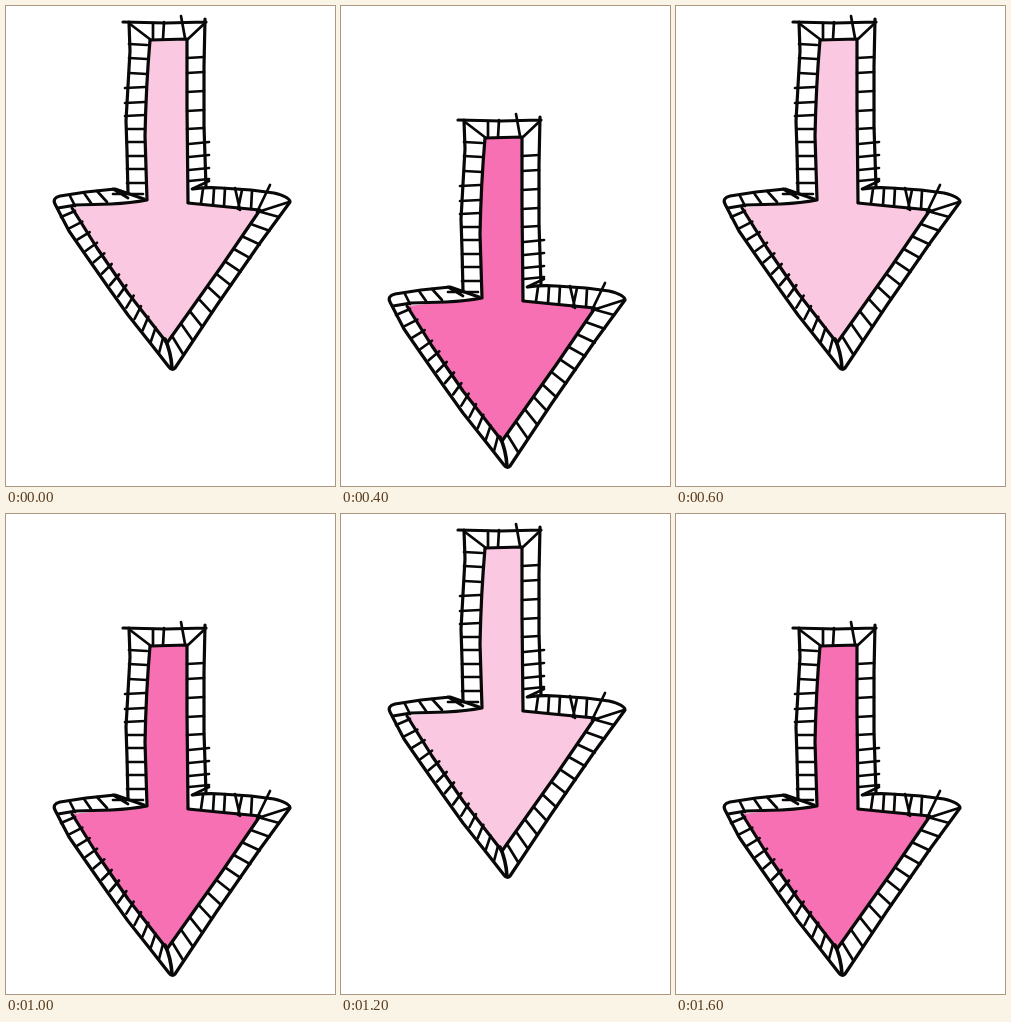
Write an HTML page that moves like this. It is 329 px wide and 480 px high and loops after 1.8 s.

```html
<!DOCTYPE html>
<html lang="en">
<head>
<meta charset="utf-8">
<title>Bouncing arrow</title>
<style>
  html, body { margin: 0; width: 100%; height: 100%; overflow: hidden; background: #fff; }
  svg { display: block; width: 329px; height: 480px; }
  .ink { fill: none; stroke: #080808; stroke-linecap: round; stroke-linejoin: round; }
</style>
</head>
<body>
<svg viewBox="0 0 329 480">
  <g id="arrow">
    <path id="fill" d="M144 34L181 33L181 100L182 197L212 200L254 204L215 261L161 337L122 287L91 242L66 202L105 198L141 194Q137 145 140 85Z"/>
    <g class="ink" stroke-width="3.2">
      <path d="M117 16L160 17L200 16M199 13L198 60L198 120L200 181"/>
      <path d="M123 16L124 45L122 80L120 115L121 145L122 187"/>
      <path d="M187 183Q200 181 215 182L245 184L268 187Q284 191 284 196L254 237L211 299L169 362Q166 365 163 361L145 338L122 309L102 281L81 251L63 225L49 198Q46 192 54 190L80 186L109 183L138 193"/>
      <path d="M144 34L181 33L181 100L182 196M144 34Q140 80 139 130L141 194Q125 197 105 198L70 199L52 202"/>
      <path d="M182 197L212 200L254 204L215 261L161 337L122 287L91 242L66 202"/>
      <path d="M159 333Q165 346 166 362" stroke-width="3.6"/>
    </g>
    <path id="ticks" class="ink" stroke-width="2.7"/>
  </g>
</svg>
<script>
  const arrow = document.getElementById('arrow');
  const fill = document.getElementById('fill');

  const rungs = (ys, x1, x2, tilt) => ys.map(y => `M${x1} ${y}L${x2} ${y + tilt}`).join('');

  // Hatching between two edges, spaced along both.
  const hatch = (n, [ax, ay, bx, by], [cx, cy, dx, dy]) =>
    Array.from({ length: n }, (_, i) => {
      const t = i / (n - 1);
      return `M${ax + (bx - ax) * t} ${ay + (by - ay) * t}L${cx + (dx - cx) * t} ${cy + (dy - cy) * t}`;
    }).join('');

  document.getElementById('ticks').setAttribute('d',
    rungs([38, 52, 67], 123, 141, 1) +
    rungs([82, 97, 110], 119, 139, -1) +
    rungs([123, 136, 150, 163, 177], 121, 139, 0) +
    rungs([52, 67, 86, 105, 123], 181, 198, -1) +
    rungs([138, 151, 164, 175], 183, 203, -2) +
    'M186 183L203 175' +
    'M124 18L145 34M199 17L182 33M147 17L147 32M158 16L157 33M175 10L179 32' +
    'M64 190L69 200M78 187L85 197M91 185L101 196M107 183L122 192M107 188L137 188' +
    'M197 183L195 197M208 183L207 199M219 182L218 200M229 182L234 204M236 184L232 203M246 185L245 203M264 179L251 206' +
    'M283 196L255 205' +
    hatch(13, [55, 211, 153, 347], [69, 205, 157, 332]) +
    hatch(11, [273, 211, 177, 348], [255, 206, 166, 330]));

  const STEP = 200;
  const poses = [
    { y: 0, color: '#fac8e1' },
    { y: 41, color: '#f99bcb' },
    { y: 98, color: '#f870b4' }
  ];
  const start = performance.now();

  function draw(now) {
    const pose = poses[Math.floor(Math.max(0, now - start) / STEP) % poses.length];
    arrow.setAttribute('transform', `translate(0 ${pose.y})`);
    fill.setAttribute('fill', pose.color);
    requestAnimationFrame(draw);
  }
  draw(start);
</script>
</body>
</html>
```
